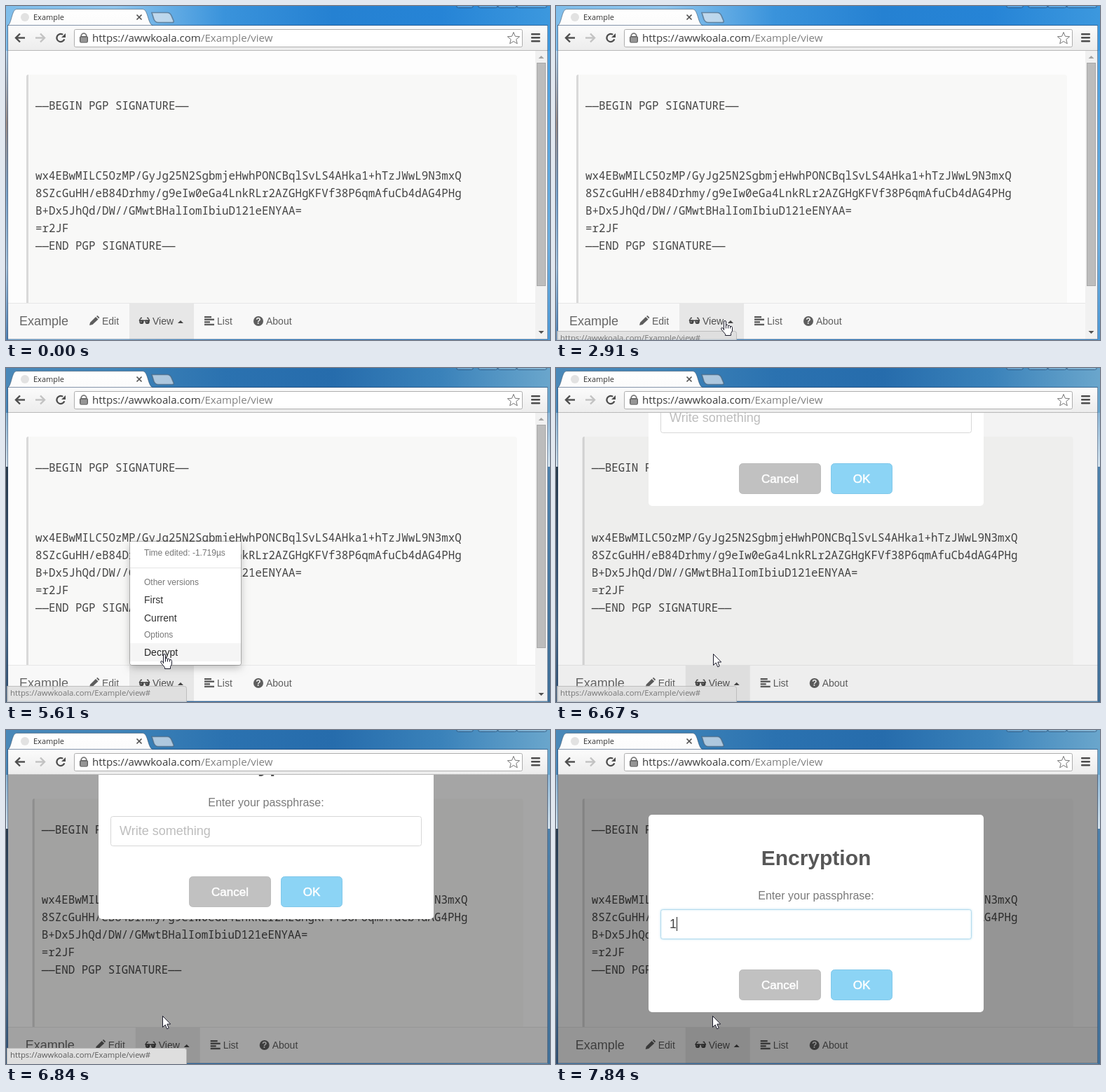
An HTML page with a canvas for the animation above (8000 ms loop, 776 by 477 pixels).

```html
<!DOCTYPE html>
<html lang="en">
<head>
<meta charset="utf-8">
<title>Example</title>
<style>
html, body { margin: 0; width: 100%; height: 100%; overflow: hidden; }
canvas { display: block; }
</style>
</head>
<body>
<canvas id="stage" width="776" height="477"></canvas>
<script>
const c = document.getElementById('stage').getContext('2d');
const LOOP = 8000;
const ARIAL = '"Liberation Sans", Arial, sans-serif';
const UI = '"Open Sans", "Noto Sans", sans-serif';
const MONO = '"Noto Sans Mono", "DejaVu Sans Mono", monospace';

function rect(x, y, w, h, fill) {
  c.fillStyle = fill;
  c.fillRect(x, y, w, h);
}

function round(x, y, w, h, r, fill, stroke) {
  c.beginPath();
  c.roundRect(x, y, w, h, r);
  if (fill) { c.fillStyle = fill; c.fill(); }
  if (stroke) { c.strokeStyle = stroke; c.lineWidth = 1; c.stroke(); }
}

function text(s, x, y, font, fill, align = 'left') {
  c.font = font;
  c.fillStyle = fill;
  c.textAlign = align;
  c.fillText(s, x, y);
}

function poly(points, fill, stroke, width = 1, close = true) {
  c.beginPath();
  points.forEach(([x, y], i) => i ? c.lineTo(x, y) : c.moveTo(x, y));
  if (close) c.closePath();
  if (fill) { c.fillStyle = fill; c.fill(); }
  if (stroke) { c.strokeStyle = stroke; c.lineWidth = width; c.stroke(); }
}

function blend(x0, y0, x1, y1, colors) {
  const g = c.createLinearGradient(x0, y0, x1, y1);
  colors.forEach((col, i) => g.addColorStop(i / (colors.length - 1), col));
  return g;
}

// Last value whose start time has passed.
function held(t, keys, before) {
  let v = before;
  for (const [time, value] of keys) if (t >= time) v = value;
  return v;
}

// Progress that advances in n equal jumps, the first one at a.
function jumps(t, a, b, n) {
  const k = Math.floor((t - a) / (b - a) * (n - 1) + 1e-6);
  return Math.max(0, Math.min(n - 1, k)) / (n - 1);
}

const mix = (a, b, p) => a + (b - a) * p;

function desktop(dim) {
  const sky = dim
    ? ['#4a88b8', '#3f84b8', '#2b72b0', '#266cac', '#3a82ba', '#6aa6cc']
    : ['#7fbdea', '#8fc6ee', '#3a93db', '#2581d2', '#2684d6', '#3c98de'];
  rect(0, 0, 776, 477, blend(0, 0, 776, 0, sky));
  rect(0, 64, 3, 413, blend(0, 64, 0, 477, dim
    ? ['#26343f', '#2c3d4d', '#38506b', '#4b6a86', '#314f70']
    : ['#b5d4ee', '#9a8b85', '#7da5cb', '#a9c6df', '#4f82b5']));
  rect(773, 64, 3, 413, blend(0, 64, 0, 477, dim
    ? ['#4f83ae', '#4a7ea8', '#44759c', '#3f6f98']
    : ['#4ba2e2', '#5ca9e0', '#6eb0df', '#4c98d6']));
  if (dim) for (const x of [0, 773]) rect(x, 64, 3, 77, blend(0, 64, 0, 141, ['#8db7d6', '#d6e4ee']));
  for (const [x, w] of [[642, 24], [673, 28], [701, 27], [728, 43]])
    round(x + .5, -6.5, w, 9, 3, 'rgba(255,255,255,.2)', 'rgba(20,55,95,.6)');
}

function tabs() {
  c.beginPath();
  c.moveTo(2, 28);
  c.bezierCurveTo(8, 27, 8, 4.5, 15, 4.5);
  c.lineTo(195, 4.5);
  c.bezierCurveTo(203, 4.5, 202, 27, 210, 28);
  c.fillStyle = blend(0, 4, 0, 28, ['#ffffff', '#fbfbfb']);
  c.fill();
  c.strokeStyle = 'rgba(60,85,110,.6)';
  c.lineWidth = 1;
  c.stroke();
  c.beginPath();
  c.arc(27, 16, 6, 0, 7);
  c.fillStyle = '#e2e2e2';
  c.fill();
  text('Example', 39, 20, '11px ' + UI, '#333');
  poly([[186.5, 12.5], [193.5, 19.5]], null, '#555', 1.7, false);
  poly([[193.5, 12.5], [186.5, 19.5]], null, '#555', 1.7, false);
  c.beginPath();
  c.moveTo(208, 9.5);
  c.lineTo(230, 9.5);
  c.quadraticCurveTo(234, 9.5, 236, 14);
  c.lineTo(239, 21);
  c.quadraticCurveTo(240, 23.5, 237, 23.5);
  c.lineTo(217, 23.5);
  c.quadraticCurveTo(213, 23.5, 211, 19);
  c.closePath();
  c.fillStyle = 'rgba(225,232,240,.7)';
  c.fill();
  c.strokeStyle = 'rgba(75,100,125,.65)';
  c.stroke();
}

function arrow(x, dir, col) {
  poly([[x - 6 * dir, 45.5], [x + 7 * dir, 45.5]], null, col, 2.4, false);
  poly([[x, 39.5], [x - 6 * dir, 45.5], [x, 51.5]], null, col, 2.4, false);
}

function toolbar() {
  rect(3, 28, 770, 36, blend(0, 28, 0, 64, ['#fbfbfb', '#ececec']));
  rect(3, 63, 770, 1, '#b9b9b9');
  arrow(20, 1, '#4d4d4d');
  arrow(49, -1, '#c2c2c2');
  c.beginPath();
  c.arc(78, 45.5, 5.6, .35, 5.3);
  c.strokeStyle = '#4d4d4d';
  c.lineWidth = 2.3;
  c.stroke();
  poly([[85, 39], [85, 45], [79, 45]], '#4d4d4d');
  round(97.5, 33.5, 639, 25, 2, '#fff', '#adadad');
  c.beginPath();
  c.arc(111, 43, 3.8, Math.PI, 0);
  c.strokeStyle = '#777';
  c.lineWidth = 1.8;
  c.stroke();
  round(105.5, 43.5, 11, 8.5, 1.5, '#858585', '#5c5c5c');
  for (const y of [46, 48, 50]) rect(107, y, 8, 1, '#a8a8a8');
  const font = '15.08px ' + UI;
  const host = 'https://awwkoala.com';
  text(host, 123, 51, font, '#3c3c3c');
  text('/Example/view', 123 + c.measureText(host).width, 51, font, '#808080');
  const star = [];
  for (let i = 0; i < 10; i++) {
    const a = i * Math.PI / 5 - Math.PI / 2, r = i % 2 ? 4 : 9;
    star.push([724 + r * Math.cos(a), 46.5 + r * Math.sin(a)]);
  }
  poly(star, '#fff', '#777');
  for (const y of [39, 44, 49]) round(749, y, 13, 2.6, 1, '#4d4d4d');
}

const LINES = [
  [148, '——BEGIN PGP SIGNATURE——'],
  [248, 'wx4EBwMILC5OzMP/GyJg25N2SgbmjeHwhPONCBqlSvLS4AHka1+hTzJWwL9N3mxQ'],
  [273, '8SZcGuHH/eB84Drhmy/g9eIw0eGa4LnkRLr2AZGHgKFVf38P6qmAfuCb4dAG4PHg'],
  [298, 'B+Dx5JhQd/DW//GMwtBHalIomIbiuD121eENYAA='],
  [323, '=r2JF'],
  [348, '——END PGP SIGNATURE——']
];

function glasses(x, y, col) {
  poly([[x, y + 4], [x + 2.5, y], [x + 4, y]], null, col, 1.3, false);
  poly([[x + 15, y + 4], [x + 12.5, y], [x + 11, y]], null, col, 1.3, false);
  rect(x, y + 3, 15, 1.5, col);
  for (const side of [.3, 8.5]) {
    round(x + side, y + 3, 6.2, 5.6, [1, 1, 2.8, 2.8], col);
    rect(x + side + 1.6, y + 4.8, 1.6, 1.3, '#aaa');
  }
}

function navIcons() {
  const col = '#5e5e5e', dark = '#444';
  poly([[119, 456], [120, 452], [128, 444], [131.5, 447.5], [123.5, 455]], col);
  poly([[129, 443], [130.5, 442], [133.3, 444.8], [132.3, 446.5]], col);
  glasses(190, 445.5, dark);
  poly([[245, 453], [249, 449], [253, 453]], dark);
  [10, 14, 8, 14].forEach((w, i) => rect(283, 443 + i * 3.6, w, 2.4, col));
  c.beginPath();
  c.arc(360, 450, 7, 0, 7);
  c.fillStyle = col;
  c.fill();
  text('?', 360, 454.3, 'bold 12px ' + ARIAL, '#f8f8f8', 'center');
}

function page(shift) {
  rect(3, 64, 770, 412, '#fdfdfd');
  c.save();
  c.translate(shift, 0);
  round(29, 98, 700, 340, 4, '#f8f8f7');
  round(29, 98, 3, 340, [3, 0, 0, 0], '#d9d9d9');
  for (const [y, s] of LINES) text(s, 42, y, '15.83px ' + MONO, '#444');
  rect(-20, 424, 800, 52, '#f8f8f8');
  rect(-20, 424, 800, 1, '#e7e7e7');
  rect(176, 425, 92, 51, '#e7e7e7');
  text('Example', 19, 456, '18px ' + ARIAL, '#666');
  const nav = '14px ' + ARIAL;
  text('Edit', 137, 455, nav, '#5e5e5e');
  text('View', 209, 455, nav, '#505050');
  text('List', 301, 455, nav, '#5e5e5e');
  text('About', 371, 455, nav, '#5e5e5e');
  navIcons();
  c.restore();
}

function scrollbar() {
  rect(755, 64, 18, 412, '#f1f1f1');
  rect(757, 81, 13, 319, '#bcbcbc');
  c.strokeStyle = '#a8a8a8';
  c.lineWidth = 1;
  c.strokeRect(757.5, 81.5, 12, 318);
  poly([[759.5, 75], [763.5, 71], [767.5, 75]], '#a3a3a3');
  poly([[759.5, 464], [763.5, 468], [767.5, 464]], '#505050');
}

function menu(hover) {
  c.save();
  c.shadowColor = 'rgba(0,0,0,.25)';
  c.shadowBlur = 12;
  c.shadowOffsetY = 4;
  round(177, 248, 158, 176, [0, 0, 2, 2], '#fff');
  c.restore();
  round(176.5, 247.5, 159, 177, [0, 0, 3, 3], null, 'rgba(0,0,0,.22)');
  rect(177, 285, 158, 1, '#e5e5e5');
  if (hover) rect(177, 393, 158, 26, '#f5f5f5');
  const small = '12px ' + ARIAL, item = '14px ' + ARIAL;
  text('Time edited: -1.719µs', 197, 268, small, '#777');
  text('Other versions', 197, 310, small, '#777');
  text('First', 197, 336, item, '#333');
  text('Current', 197, 362, item, '#333');
  text('Options', 197, 385, small, '#777');
  text('Decrypt', 197, 411, item, hover ? '#262626' : '#333');
}

function button(label, x, y, w, fill, edge) {
  round(x + .5, y + .5, w - 1, 43, 5, fill, edge);
  text(label, x + w / 2, y + 27.5, '17px ' + ARIAL, '#fff', 'center');
  c.strokeStyle = '#fff';
  c.lineWidth = .5;
  c.strokeText(label, x + w / 2, y + 27.5);
}

function dialog(y, t) {
  round(132, y, 478, 282, 5, '#fff');
  text('Encryption', 371, y + 72, 'bold 30px ' + ARIAL, '#575757', 'center');
  text('Enter your passphrase:', 371, y + 121, '16px ' + ARIAL, '#797979', 'center');
  const focus = held(t, [[7140, .5], [7210, 1]], 0);
  c.save();
  if (focus) {
    c.shadowColor = `rgba(196,230,245,${focus})`;
    c.shadowBlur = 3;
  }
  round(149.5, y + 135.5, 443, 42, 3, '#fff', focus ? '#b4dbed' : '#d7d7d7');
  c.restore();
  const font = '18px ' + ARIAL;
  if (t < 7720) text('Write something', 162, y + 162, font, t < 7460 ? '#bdbdbd' : '#dedede');
  else text('1', 162, y + 162, font, '#444');
  if (t >= 7840) rect(172, y + 146, 1, 20, '#222');
  button('Cancel', 261, y + 221, 117, '#c1c1c1', '#bdbdbd');
  button('OK', 392, y + 221, 88, '#8cd4f5', '#82c8ea');
}

function status(y, alpha) {
  if (!alpha) return;
  c.save();
  c.globalAlpha = alpha;
  round(1.5, y + .5, 256, 30, [0, 3, 0, 0], '#dedede', '#b4b4b4');
  text('https://awwkoala.com/Example/view#', 6, y + 14, '11.3px ' + UI, '#5c5c5c');
  c.restore();
}

function pointer(x, y) {
  poly([[x + .5, y + .5], [x + .5, y + 16.5], [x + 4.2, y + 13], [x + 6.7, y + 18.8],
    [x + 9.2, y + 17.7], [x + 6.8, y + 12], [x + 11.7, y + 12]], '#fff', '#1c1c2c');
}

function hand(x, y) {
  c.save();
  c.translate(x - 6, y);
  c.beginPath();
  c.moveTo(4.5, 14);
  c.lineTo(4.5, 2);
  c.quadraticCurveTo(4.5, .5, 6, .5);
  c.quadraticCurveTo(7.5, .5, 7.5, 2);
  c.lineTo(7.5, 6.5);
  c.quadraticCurveTo(9.5, 5.5, 10.5, 7.5);
  c.quadraticCurveTo(12.5, 6.6, 13.5, 8.5);
  c.quadraticCurveTo(16.5, 8, 16.5, 10.5);
  c.lineTo(16.5, 15);
  c.lineTo(14.5, 18.5);
  c.lineTo(14.5, 21.5);
  c.lineTo(6.5, 21.5);
  c.lineTo(6.5, 19.5);
  c.lineTo(1, 13);
  c.quadraticCurveTo(0, 10.5, 2, 10.5);
  c.quadraticCurveTo(3.5, 11, 4.5, 13);
  c.closePath();
  c.fillStyle = '#fff';
  c.fill();
  c.strokeStyle = '#1c1c2c';
  c.lineWidth = 1;
  c.stroke();
  for (const px of [7.5, 10.5, 13.5])
    poly([[px, px < 8 ? 6 : 8], [px, 11.5]], null, '#1c1c2c', 1, false);
  c.restore();
}

const HAND_MOVES = [
  [2910, [241, 449]], [2950, [241, 450]], [4580, [237, 434]],
  [4770, [232, 422]], [4840, [228, 413]], [4980, [227, 411]], [5030, [226, 409]],
  [5390, [226, 404]], [5460, [227, 406]], [5610, [226, 408]]
];

function cursor(t) {
  if (t < 1250) return;
  if (t < 2060) {
    const p = 1 - (1 - jumps(t, 1250, 1970, 10)) ** 1.5;
    pointer(Math.round(mix(641, 240, p)), Math.round(mix(464, 382, p)));
  } else if (t < 2910) {
    const p = jumps(t, 2060, 2820, 10);
    const y = Math.round(mix(386, 449, 1 - (1 - p) ** 1.8));
    (y > 424 ? hand : pointer)(241, y);
  } else if (t < 6570) {
    hand(...held(t, HAND_MOVES));
  } else {
    pointer(t < 6740 ? 224 : 223, 408);
  }
}

function draw(t) {
  const modal = t >= 6570;
  desktop(t >= 3990);
  tabs();
  toolbar();
  c.save();
  c.beginPath();
  c.rect(3, 64, 770, 412);
  c.clip();
  page(modal ? 8.7 : 0);
  if (!modal) scrollbar();
  if (t >= 4300 && !modal) menu(t >= 4980);
  if (modal) {
    const shade = held(t, [[6670, .04], [6740, .18], [6840, .35], [6970, .4]], 0);
    rect(3, 64, 770, 412, `rgba(0,0,0,${shade})`);
    const y = held(t, [[6670, -85], [6740, -64], [6840, -12], [6970, 121]], -300);
    dialog(y, t);
  }
  c.restore();
  c.strokeStyle = 'rgba(35,65,105,.55)';
  c.lineWidth = 1;
  c.strokeRect(2.5, 27.5, 770, 448.5);
  const alpha = held(t, [[2480, .2], [2570, .4], [2650, .6], [2740, .8], [6740, 1], [6970, 0]], 0);
  status(held(t, [[2910, 464], [2950, 463], [4580, 454]], 465), alpha);
  cursor(t);
}

const start = performance.now();
function tick() {
  draw((performance.now() - start) % LOOP);
  requestAnimationFrame(tick);
}
tick();
</script>
</body>
</html>
```
